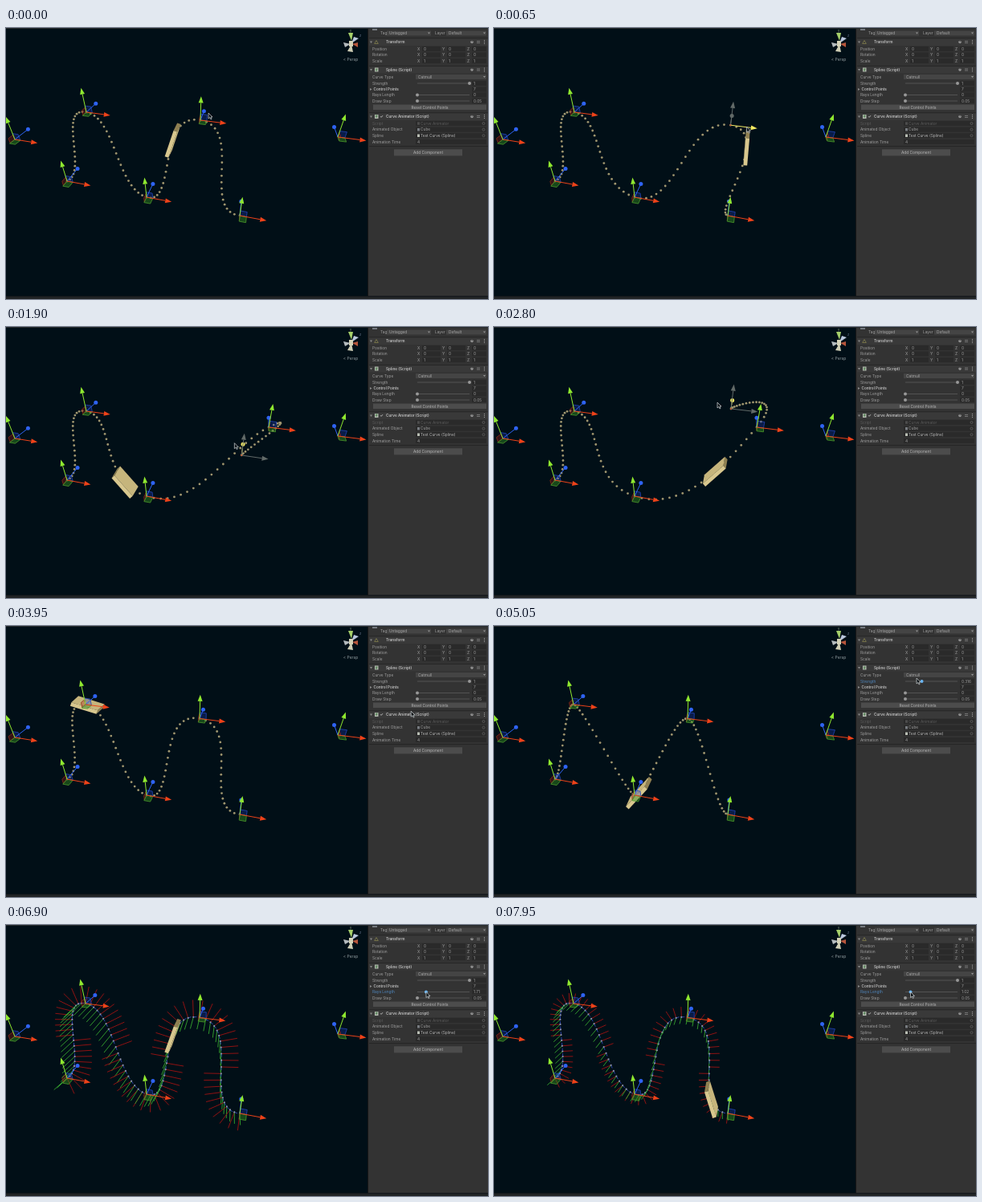
An HTML page with a canvas for the animation above (8 s loop, 600 by 338 pixels).

```html
<!DOCTYPE html>
<html lang="en">
<head>
<meta charset="utf-8">
<title>Spline editor</title>
<style>
  html, body { margin: 0; width: 100%; height: 100%; overflow: hidden; background: #010f17; }
  canvas { display: block; width: 600px; height: 338px; }
</style>
</head>
<body>
<canvas id="stage" width="600" height="338"></canvas>
<script>
const ctx = document.getElementById('stage').getContext('2d');
const LOOP = 8000, CUT = 3800;
const GREEN = '#8fe82f', RED = '#ee4219', BLUE = '#2f63f2', YELLOW = '#f4ea62', GRAY = '#626a68';

// ---------- helpers ----------
const add = (a, b, k = 1) => [a[0] + b[0] * k, a[1] + b[1] * k];
const sub = (a, b) => add(a, b, -1);
const cross = (a, b) => a[0] * b[1] - a[1] * b[0];
const unit = v => { const n = Math.hypot(...v) || 1; return [v[0] / n, v[1] / n]; };

// Linear interpolation through keys [time, ...values].
function track(keys, t) {
  const i = keys.findIndex(k => k[0] > t);
  if (i === 0) return keys[0].slice(1);
  if (i < 0) return keys[keys.length - 1].slice(1);
  const [a, b] = [keys[i - 1], keys[i]];
  const f = (t - a[0]) / (b[0] - a[0]);
  return a.slice(1).map((v, j) => v + (b[j + 1] - v) * f);
}
function rect(x, y, w, h, color) { ctx.fillStyle = color; ctx.fillRect(x, y, w, h); }
function disc(x, y, r, color) {
  ctx.fillStyle = color;
  ctx.beginPath(); ctx.arc(x, y, r, 0, 7); ctx.fill();
}
function line(a, b, color, width = 1) {
  ctx.strokeStyle = color; ctx.lineWidth = width;
  ctx.beginPath(); ctx.moveTo(...a); ctx.lineTo(...b); ctx.stroke();
}
function poly(points, fill, stroke, width = 0.8) {
  ctx.beginPath();
  points.forEach(p => ctx.lineTo(...p));
  ctx.closePath();
  if (fill) { ctx.fillStyle = fill; ctx.fill(); }
  if (stroke) { ctx.strokeStyle = stroke; ctx.lineWidth = width; ctx.stroke(); }
}
function text(s, x, y, color = '#a0a0a0', weight = 400, align = 'left', size = 4.8) {
  ctx.font = `${weight} ${size}px Inter, sans-serif`;
  ctx.textAlign = align; ctx.textBaseline = 'middle';
  ctx.fillStyle = color;
  ctx.fillText(s, x, y + 0.3);
}

// ---------- state over time ----------
const dragX = [[250, 242, 115], [900, 327, 125]];
const dragZ = [[1200, 291, 234], [2450, 295, 102]];
const strengthKeys = [[4400, 1], [4800, 0], [5050, 0.315], [5700, 1]];
const rayKeys = [[6150, 0], [6200, 0.09], [6900, 1.71], [7250, 2.3], [7950, 1.02], [8000, 0.95]];
const cursorKeys = [
  [0, 252, 106], [250, 262, 117], [900, 347, 127], [1150, 293, 214], [2450, 278, 94],
  [CUT - 1, 278, 94], [CUT, 480, 120], [4400, 576, 65], [4800, 508, 65], [5050, 526, 65],
  [5700, 576, 65], [6150, 512, 84]
];

function controlPoints(t) {
  const late = t >= CUT;
  return [
    [11, 139], [76, 191], late ? [99, 98] : [100, 105], [175, 211],
    late ? [241, 115.5] : track(dragX, t),
    late ? [291, 235] : track(dragZ, t),
    [413, 136]
  ];
}
function cubePosition(t) {
  const s = t / 1000;
  if (s < 0.95) return 2.65 + s;
  if (t < CUT) return 1.13 + 0.9 * (s - 1.15);
  if (s < 6) return s - 2.93;
  return 1.93 + 1.05 * (s - 6.2);
}

// ---------- projection ----------
// Screen vector of the depth axis at a point.
const depthAt = ([x, y]) => [17 - x * 0.052, -5 - y * 0.055];

// ---------- curve ----------
// Tangent weights stand in for the perspective of the scene.
function tangents(p, strength) {
  const span = i => sub(p[i + 1], p[i - 1]);
  const weighted = (i, k) => span(i).map(v => v * k);
  const [m3x, m3y] = weighted(3, 0.8), [m4x, m4y] = weighted(4, 1.36);
  return [
    [0, 0], weighted(1, 0.9), weighted(2, 1.12),
    [m3x, m3y + 0.24 * m3x], [m4x + 0.26 * m4y, m4y],
    [1.75 * (327 - p[4][0]), 0.9 * span(5)[1]]
  ].map(v => [v[0] * strength, v[1] * strength]);
}
function curveAt(p, m, u) {
  const i = Math.min(Math.floor(u), 3) + 1, t = u - i + 1;
  const mix = (a, b, c, d) => [0, 1].map(k => a * p[i][k] + b * m[i][k] + c * p[i + 1][k] + d * m[i + 1][k]);
  const t2 = t * t, t3 = t2 * t;
  return {
    pos: mix(2 * t3 - 3 * t2 + 1, t3 - 2 * t2 + t, 3 * t2 - 2 * t3, t3 - t2),
    dir: unit(mix(6 * t2 - 6 * t, 3 * t2 - 4 * t + 1, 6 * t - 6 * t2, 3 * t2 - 2 * t)),
    bend: mix(12 * t - 6, 6 * t - 4, 6 - 12 * t, 6 * t - 2)
  };
}
function drawCurve(p, m, rays) {
  for (let n = 0; n <= 80; n++) {
    const { pos, dir, bend } = curveAt(p, m, n / 20);
    if (rays > 0) {
      const outward = Math.sign(cross(dir, bend)) || 1;
      line(pos, add(pos, [dir[1], -dir[0]], 12.5 * rays * outward), '#a01212', 0.9);
      line(pos, add(pos, [pos[0] * 0.046 - 13, 8.5], rays), '#36a52f', 0.9);
      line(pos, add(pos, dir, Math.min(4, 12 * rays)), '#2f48b4', 0.9);
    }
    disc(...pos, rays > 0.3 ? 1.1 : 1.4, rays > 0.3 ? '#8a90ac' : '#a0966f');
  }
}
function drawCube({ pos, dir }) {
  const side = [dir[1], -dir[0]];
  const depth = depthAt(pos).map(v => v * 0.75);
  const origin = add(pos, depth, -0.5);
  const corner = (a, b) => add(add(origin, dir, a * 17), side, b * 2.4);
  const front = [corner(-1, -1), corner(1, -1), corner(1, 1), corner(-1, 1)];
  front.forEach((q, i) => {
    const next = front[(i + 1) % 4];
    if (cross(sub(next, q), depth) > 0) {
      poly([q, next, add(next, depth), add(q, depth)], i % 2 ? '#8f8052' : '#c6b57c');
    }
  });
  poly(front, '#d8c78e');
}

// ---------- move handles ----------
function arrow(from, to, color) {
  const d = unit(sub(to, from)), n = [-d[1], d[0]];
  const base = add(to, d, -8);
  line(from, base, color, 1);
  poly([to, add(base, n, 3), add(base, n, -3)], color);
}
function drawHandle(o, active) {
  const [x, y] = o;
  const up = [(x - 225) / 19, y * 0.055 - 36];
  const right = [28 + x * 0.018, 2 + y * 0.018];
  const deep = depthAt(o);
  const color = (axis, c) => !active ? c : active === axis ? YELLOW : GRAY;
  const plane = (a, ka, b, kb, fill, stroke) =>
    poly([o, add(o, a, ka), add(add(o, a, ka), b, kb), add(o, b, kb)], fill, stroke);

  if (!active) {
    plane(right, 0.25, up, 0.26, 'rgba(30,60,190,.3)', '#2444b4');
    plane(up, 0.2, deep, -0.35, 'rgba(170,30,15,.3)', '#8f2a18');
    plane(right, 0.25, deep, -0.4, 'rgba(50,140,30,.45)', '#4d9a2c');
  }
  const deepColor = color('deep', BLUE), end = add(o, deep);
  line(o, end, deepColor, 1);
  disc(...end, 2.5, deepColor);
  arrow(o, add(o, up), color('up', GREEN));
  arrow(o, add(o, right), color('right', RED));
  if (active) disc(x, y, 1, '#c8502c');
}
function drawViewCube() {
  poly([[426, 6], [432, 6], [430, 16]], '#a5cf6a');
  poly([[433, 11], [439, 13], [430, 19]], '#b9c6dc');
  poly([[420, 18], [422, 24], [429, 20]], '#b4babd');
  poly([[438, 18], [438, 24], [431, 20]], '#b8563c');
  poly([[425, 29], [432, 30], [430, 20]], '#cfcdb4');
  rect(427, 16, 5, 7, '#d5d2b8');
  text('y', 429, 3.5, '#87977a', 400, 'center', 4);
  text('z', 441, 9, '#6d7a95', 400, 'center', 4);
  text('< Persp', 429, 39, '#9aa3a6', 400, 'center', 5);
}
function drawCursor([x, y]) {
  poly([[x, y], [x, y + 7], [x + 1.8, y + 5.5], [x + 3, y + 8], [x + 4, y + 7.4], [x + 3, y + 5], [x + 5, y + 5]],
    '#10161a', '#d4d8da', 0.7);
}

// ---------- inspector ----------
function field(s, x, y, w, color) {
  rect(x, y - 3, w, 6, '#2a2a2a');
  text(s, x + 2, y, color);
}
function button(s, x, y, w, h = 6.5) {
  rect(x, y - h / 2, w, h, '#4c4c4c');
  text(s, x + w / 2, y, '#b8b8b8', 400, 'center');
}
function dropdown(s, x, y, w) {
  rect(x, y - 3, w, 6, '#444444');
  text(s, x + 3, y, '#a8a8a8');
  poly([[x + w - 4, y - 1], [x + w - 1, y - 1], [x + w - 2.5, y + 1]], '#989898');
}
function header(s, y, icon) {
  rect(452, y - 4.5, 148, 9, '#393939');
  rect(452, y - 5, 148, 0.7, '#202020');
  poly([[453, y - 1], [456, y - 1], [454.5, y + 1.5]], '#8c8c8c');
  if (icon) {
    rect(459, y - 2.5, 4.5, 5, '#b4bab0');
    text('#', 461.2, y, '#477a48', 700, 'center', 4.5);
  } else {
    poly([[461, y - 2], [463.3, y + 2], [458.7, y + 2]], null, '#8d8850', 0.7);
  }
  text(s, 473, y, '#c2c2c2', 600, 'left', 4.7);
  disc(580, y, 1.7, '#a4a4a4');
  text('?', 580, y, '#333333', 700, 'center', 3.5);
  line([586, y - 1], [590, y - 1], '#909090', 0.7);
  line([586, y + 1], [590, y + 1], '#909090', 0.7);
  [-2, 0, 2].forEach(d => disc(595.5, y + d, 0.6, '#b4b4b4'));
}
function slider(label, y, knobX, value, active) {
  text(label, 456, y, active ? '#4f86bd' : '#a0a0a0');
  line([512, y], [577, y], '#5c5c5c', 0.8);
  disc(knobX, y, 2, active ? '#69b4f0' : '#989898');
  field(value, 580, y, 18);
}
function drawInspector(t, strength, rays) {
  rect(451, 0, 149, 338, '#333333');
  rect(450, 0, 1, 338, '#161616');
  rect(456, 0, 6, 3, '#757a80');
  text('Tag', 466, 6.5);
  dropdown('Untagged', 474, 6.5, 55);
  text('Layer', 534, 6.5);
  dropdown('Default', 548, 6.5, 50);

  header('Transform', 17.5, false);
  [['Position', 26, '0'], ['Rotation', 33.5, '0'], ['Scale', 41, '1']].forEach(([label, y, value]) => {
    text(label, 456, y);
    ['X', 'Y', 'Z'].forEach((axis, i) => {
      text(axis, 512 + i * 31, y);
      field(value, 518 + i * 31, y, i < 2 ? 23 : 18);
    });
  });

  header('Spline (Script)', 52, true);
  text('Curve Type', 456, 61);
  dropdown('Catmull', 510, 61, 88);
  slider('Strength', 69, 512 + 65 * strength, String(+strength.toFixed(3)), t > 4400 && t < 5850);
  poly([[453, 75], [453, 78], [455.5, 76.5]], '#8c8c8c');
  text('Control Points', 457.5, 76.5, '#bcbcbc', 600, 'left', 4.6);
  field('7', 580, 76.5, 18);
  slider('Rays Length', 83.5, 512 + 6.4 * rays, rays ? rays.toFixed(2) : '0', t > 6100);
  slider('Draw Step', 91, 512, '0.05', false);
  button('Reset Control Points', 457, 98.8, 141);

  header('Curve Animator (Script)', 110.5, true);
  text('✓', 467.5, 110.5, '#bcbcbc', 700, 'center', 5);
  text('Script', 456, 119, '#5c5c5c');
  field('   Curve Animator', 510, 119, 88, '#5c5c5c');
  text('Animated Object', 456, 126.7);
  field('   Cube', 510, 126.7, 88);
  text('Spline', 456, 134.2);
  field('   Test Curve (Spline)', 510, 134.2, 88, '#b8b8b8');
  [119, 126.7, 134.2].forEach((y, i) => {
    rect(512, y - 1.7, 3, 3.5, ['#4c4c4c', '#777b80', '#b9beb4'][i]);
    ctx.strokeStyle = '#707070'; ctx.lineWidth = 0.6;
    ctx.beginPath(); ctx.arc(594.5, y, 1.5, 0, 7); ctx.stroke();
  });
  text('Animation Time', 456, 142);
  field('4', 510, 142, 88);
  rect(452, 147, 148, 0.7, '#202020');
  button('Add Component', 483, 155.3, 85, 8);
}

// ---------- frame ----------
function draw(t) {
  const points = controlPoints(t);
  const strength = track(strengthKeys, t)[0], rays = track(rayKeys, t)[0];
  const m = tangents(points, strength);

  rect(0, 0, 600, 338, '#010f17');
  drawCurve(points, m, rays);
  drawCube(curveAt(points, m, cubePosition(t)));
  points.forEach((p, i) => {
    const pulled = i === 4 && t > 200 && t < 920 ? 'right'
      : i === 5 && t > 1080 && t < CUT ? 'deep' : null;
    drawHandle(p, pulled);
  });
  drawViewCube();
  drawInspector(t, strength, rays);
  rect(0, 0, 600, 1, '#252a2c');
  rect(0, 334.5, 600, 3.5, '#202325');
  rect(0, 334, 600, 0.8, '#111518');
  drawCursor(t > 6150 ? [512 + 6.4 * rays, 83.5] : track(cursorKeys, t));
}

function tick() {
  draw(performance.now() % LOOP);
  requestAnimationFrame(tick);
}
tick();
</script>
</body>
</html>
```
